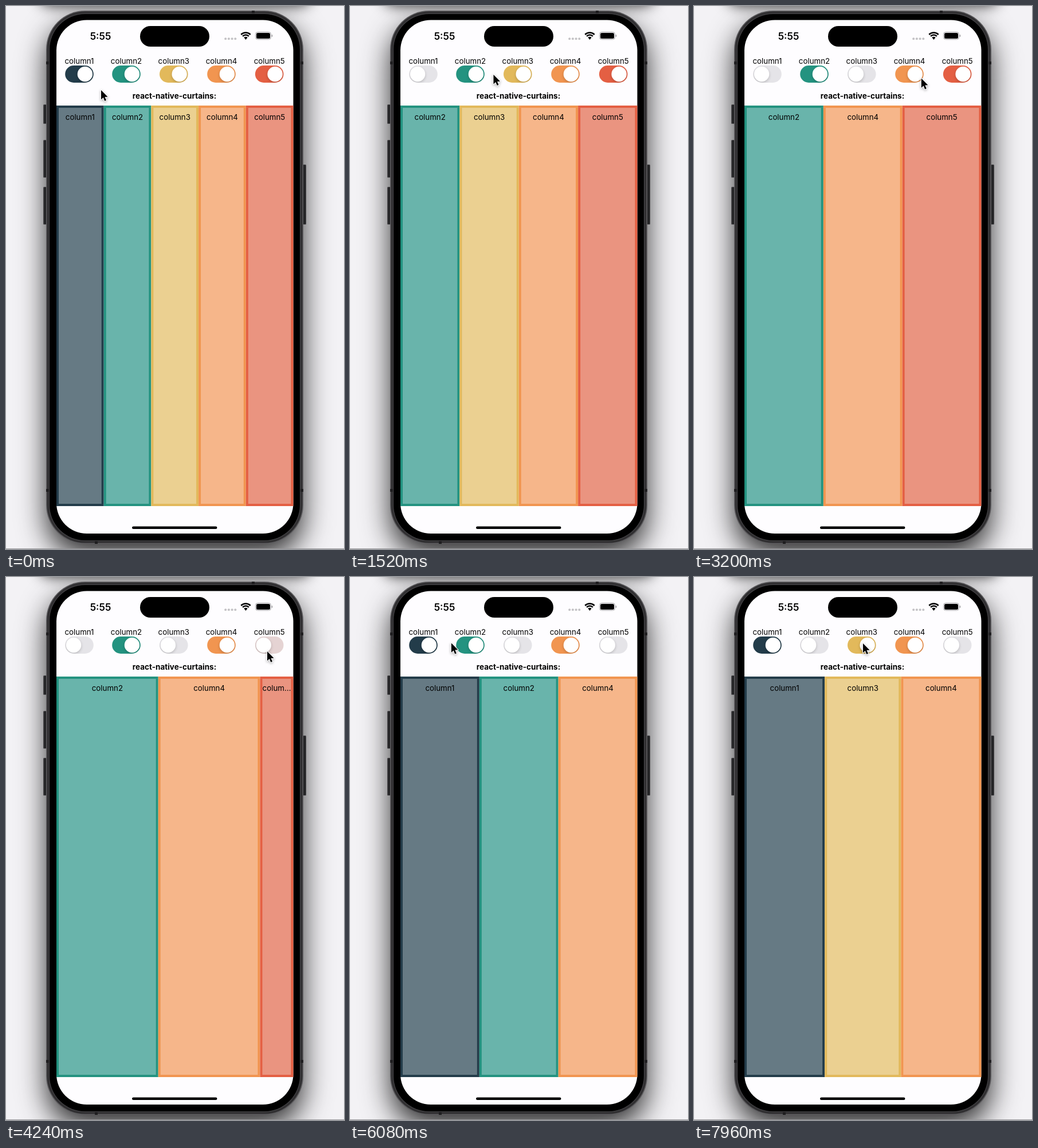
Write an HTML page with a canvas that moves like this. It is 590x949 px and loops after 8000 ms.

```html
<!DOCTYPE html>
<html lang="en">
<head>
<meta charset="utf-8">
<title>Curtain columns</title>
<style>
  html, body { margin: 0; width: 100%; height: 100%; overflow: hidden; background: #f3f2f5; }
  canvas { display: block; width: 590px; height: 949px; }
</style>
</head>
<body>
<canvas id="stage" width="590" height="949"></canvas>
<script>
const LOOP = 8000;
const COLUMN_MS = 500, KNOB_MS = 250, FADE_MS = 500, TAP_LEAD = 90;
const AREA = { x: 88, y: 174, w: 413.5, h: 700 };
const OFF = [229, 228, 232];
const FONT = 'Inter, Roboto, sans-serif';

const columns = [
  { name: 'column1', x: 128, edge: [35, 60, 74], fill: '#667a84' },
  { name: 'column2', x: 210, edge: [36, 147, 128], fill: '#69b4ab' },
  { name: 'column3', x: 292.8, edge: [226, 185, 91], fill: '#ebd091' },
  { name: 'column4', x: 376, edge: [241, 149, 80], fill: '#f6b68a' },
  { name: 'column5', x: 459.7, edge: [228, 95, 67], fill: '#ea9480' }
];

// column index, start of its width change, new state
const toggles = [
  [0, 500, 0], [2, 2105, 0], [4, 3943, 0],
  [0, 5470, 1], [1, 6686, 0], [2, 7540, 1]
];

// time, x, y of the pointer tip
const pointerPath = [
  [0, 166, 147], [400, 142, 118], [900, 142, 118], [1900, 302, 121],
  [2450, 302, 121], [3750, 456, 130], [4300, 456, 130], [5250, 126, 112],
  [5600, 126, 112], [6450, 211, 118], [6750, 211, 118], [7300, 295, 116],
  [8000, 295, 116]
];

const canvas = document.getElementById('stage');
const backdrop = document.createElement('canvas');
backdrop.width = canvas.width;
backdrop.height = canvas.height;
let ctx = backdrop.getContext('2d');

const clamp = u => Math.min(1, Math.max(0, u));
const mix = (a, b, u) => a + (b - a) * u;
const smooth = u => u * u * (3 - 2 * u);
const quad = u => u < 0.5 ? 2 * u * u : 1 - 2 * (1 - u) * (1 - u);
const rgb = c => `rgb(${c.map(Math.round).join()})`;

function box(x, y, w, h, r, fill) {
  ctx.beginPath();
  ctx.roundRect(x, y, w, h, r);
  ctx.fillStyle = fill;
  ctx.fill();
}

function disc(x, y, r, fill) {
  ctx.beginPath();
  ctx.arc(x, y, r, 0, Math.PI * 2);
  ctx.fillStyle = fill;
  ctx.fill();
}

function shadow(color, blur, dy) {
  ctx.shadowColor = color;
  ctx.shadowBlur = blur;
  ctx.shadowOffsetY = dy;
}

function label(text, x, y, size = 13.3, weight = 400, align = 'center') {
  ctx.font = `${weight} ${size}px ${FONT}`;
  ctx.textAlign = align;
  ctx.fillStyle = '#000';
  ctx.fillText(text, x, y);
}

// Value between 0 and 1 of one column's switch at time t
function progress(index, t, lead, duration, ease) {
  let value = 1;
  for (const [i, start, to] of toggles) {
    if (i === index) value = mix(value, to, ease(clamp((t - start + lead) / duration)));
  }
  return value;
}

function drawPhone() {
  ctx.fillStyle = '#f3f2f5';
  ctx.fillRect(0, 0, 590, 949);
  ctx.save();
  shadow('rgba(0,0,0,.9)', 24, 0);
  box(58, -60, 474, 58, 20, '#59585b');
  shadow('rgba(0,0,0,.82)', 50, 22);
  box(71, 9, 447, 930, 66, '#333');
  ctx.restore();

  for (const [x, y, h] of [[65, 172, 34], [65, 234, 66], [65, 316, 66], [517, 277, 105]]) {
    box(x, y, 7, h, 1.5, '#4b4a4d');
    box(x + 1.2, y + 1, 5, h - 2, 1, '#252527');
  }
  box(70, 8, 449, 932, 68, '#5e5d60');
  box(71.5, 9.5, 446, 929, 66.5, '#302f31');
  ctx.fillStyle = '#1f1e20';
  for (const x of [70, 514]) {
    for (const y of [97, 844]) ctx.fillRect(x, y, 5, 5);
  }
  ctx.fillRect(429, 8, 5, 5);
  ctx.fillRect(155, 935, 5, 5);
  box(75, 13, 439, 922, 63, '#48474a');
  box(76, 14, 437, 920, 62, '#000');
  box(88, 24.5, 413.5, 897.5, 53, '#fefdff');
  ctx.fillStyle = '#98979a';
  ctx.fillRect(0, 948, 590, 1);
}

function drawStatusBar() {
  label('5:55', 165, 59, 17, 600);
  box(234, 35, 121, 36, 18, '#000');
  for (let i = 0; i < 4; i++) disc(383.2 + i * 5.7, 57.2, 2, '#c3c2c5');

  ctx.strokeStyle = '#000';
  ctx.lineWidth = 2.5;
  for (const r of [11.6, 7.6]) {
    ctx.beginPath();
    ctx.arc(418.5, 58.2, r, -Math.PI * 0.75, -Math.PI * 0.25);
    ctx.stroke();
  }
  ctx.beginPath();
  ctx.moveTo(418.5, 59);
  ctx.arc(418.5, 58.2, 4.4, -Math.PI * 0.75, -Math.PI * 0.25);
  ctx.fillStyle = '#000';
  ctx.fill();

  ctx.beginPath();
  ctx.roundRect(435.5, 45.5, 27, 13, 4);
  ctx.strokeStyle = '#a09fa2';
  ctx.lineWidth = 1;
  ctx.stroke();
  box(437, 47, 24, 10, 2.5, '#000');
  box(463.8, 50, 1.5, 4, 1, '#a09fa2');
}

function drawStatic() {
  drawPhone();
  drawStatusBar();
  for (const c of columns) label(c.name, c.x, 100.8);
  label('react-native-curtains:', 294, 162.3, 13.5, 700);
  box(220, 909.5, 148.5, 4.6, 2.3, '#000');
}

function drawSwitch(c, index, t) {
  const knob = progress(index, t, TAP_LEAD + 40, KNOB_MS, smooth);
  const tint = progress(index, t, TAP_LEAD, FADE_MS, smooth);
  box(c.x - 24.8, 104, 49.6, 30, 15, rgb(OFF.map((v, i) => mix(v, c.edge[i], tint))));
  ctx.save();
  ctx.beginPath();
  ctx.roundRect(c.x - 24.8, 104, 49.6, 30, 15);
  ctx.clip();
  shadow('rgba(0,0,0,.2)', 5, 2);
  disc(c.x + mix(-9.9, 9.9, knob), 119, 13.2, '#fff');
  ctx.restore();
}

function fitText(text, room) {
  if (ctx.measureText(text).width <= room) return text;
  let n = text.length - 1;
  while (n > 1 && ctx.measureText(text.slice(0, n) + '…').width > room) n--;
  return text.slice(0, n) + '…';
}

function drawColumn(c, x, w) {
  const { y, h } = AREA, b = 4;
  ctx.fillStyle = rgb(c.edge);
  ctx.fillRect(x, y, w, h);
  const inner = w - 2 * b;
  if (inner <= 0) return;
  ctx.fillStyle = c.fill;
  ctx.fillRect(x + b, y + b, inner, h - 2 * b);

  ctx.save();
  ctx.beginPath();
  ctx.rect(x + b - 0.5, y, inner + 1, h);
  ctx.clip();
  ctx.font = `400 13.3px ${FONT}`;
  const text = fitText(c.name, inner + 1);
  const left = Math.max(x + b - 0.5, x + (w - ctx.measureText(text).width) / 2);
  label(text, left, 198.8, 13.3, 400, 'left');
  ctx.restore();
}

function drawColumns(t) {
  const weights = columns.map((c, i) => progress(i, t, 0, COLUMN_MS, quad));
  const unit = AREA.w / weights.reduce((a, b) => a + b);
  let x = AREA.x;
  columns.forEach((c, i) => {
    const w = weights[i] * unit;
    if (w > 0) drawColumn(c, x, w);
    x += w;
  });
}

function drawPointer(t) {
  const i = pointerPath.findIndex(p => p[0] > t);
  const a = pointerPath[i - 1], b = pointerPath[i];
  const u = smooth((t - a[0]) / (b[0] - a[0]));
  ctx.save();
  ctx.translate(mix(a[1], b[1], u), mix(a[2], b[2], u));
  ctx.beginPath();
  [[0, 0], [0, 16.5], [3.8, 13], [6.3, 19], [9, 17.8], [6.5, 12], [11.6, 11.7]]
    .forEach(([x, y]) => ctx.lineTo(x, y));
  ctx.closePath();
  ctx.lineJoin = 'round';
  ctx.lineWidth = 2;
  ctx.strokeStyle = '#fff';
  shadow('rgba(0,0,0,.35)', 4, 1.5);
  ctx.stroke();
  shadow('transparent', 0, 0);
  ctx.fillStyle = '#000';
  ctx.fill();
  ctx.restore();
}

function render(now) {
  const t = now % LOOP;
  ctx.drawImage(backdrop, 0, 0);
  columns.forEach((c, i) => drawSwitch(c, i, t));
  drawColumns(t);
  drawPointer(t);
}

drawStatic();
ctx = canvas.getContext('2d');
const begin = performance.now();
function tick() {
  render(performance.now() - begin);
  requestAnimationFrame(tick);
}
tick();
</script>
</body>
</html>
```
